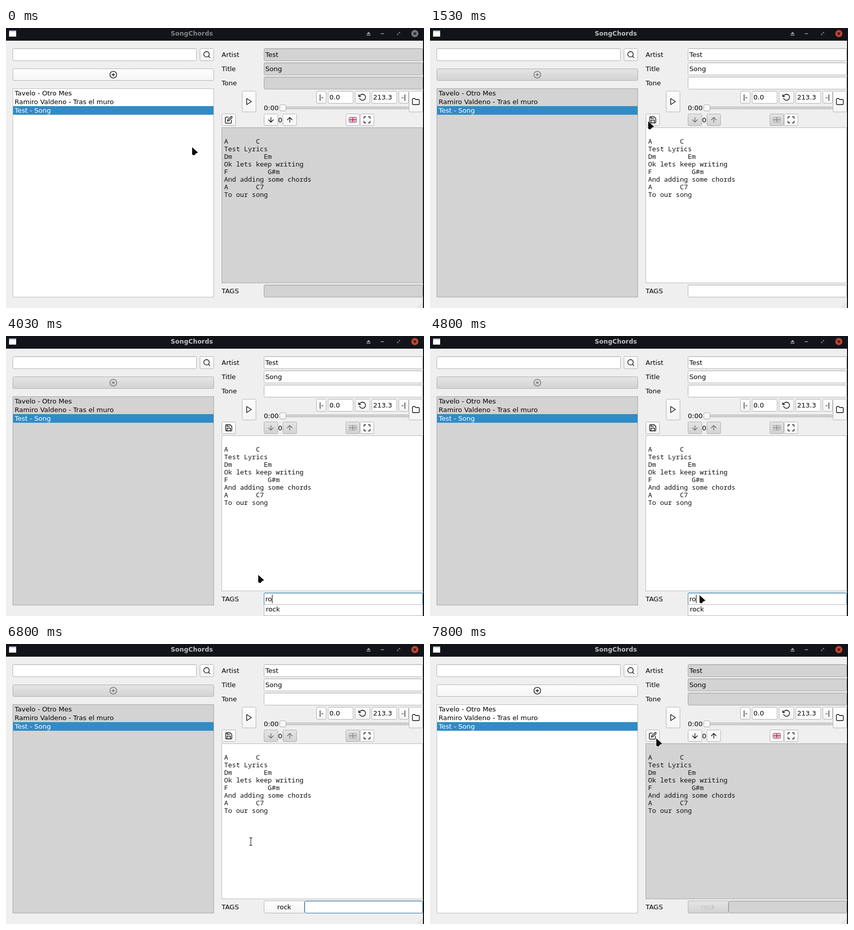
An HTML page for the animation above (8 s loop, 822 by 552 pixels).

```html
<!DOCTYPE html>
<html lang="en">
<head>
<meta charset="utf-8">
<title>SongChords</title>
<style>
html, body { margin: 0; width: 100%; height: 100%; overflow: hidden; background: #efefef; }
svg { display: block; font: 13px "DejaVu Sans", sans-serif; fill: #000; }
text { white-space: pre; }
.mono { font-family: "Noto Sans Mono", monospace; fill: #111; }
.title { font-weight: bold; font-size: 12px; letter-spacing: .17px; }
.icon { fill: none; stroke-width: 2; stroke-linecap: round; stroke-linejoin: round; }
</style>
</head>
<body>
<svg id="stage" width="822" height="552" viewBox="0 0 822 552">
  <defs>
    <linearGradient id="up" x2="0" y2="1"><stop stop-color="#fefefe"/><stop offset="1" stop-color="#f4f4f4"/></linearGradient>
    <linearGradient id="off" x2="0" y2="1"><stop stop-color="#e5e5e5"/><stop offset="1" stop-color="#d2d2d2"/></linearGradient>
  </defs>
  <rect width="822" height="552" fill="#efefef"/>
  <rect width="822" height="25" fill="#131419"/>
  <rect x="820" width="2" height="552" fill="#131419"/>
  <g id="bar"></g>
  <g id="fixed"></g>
  <g id="view"></g>
  <g id="edit"></g>
  <g id="tags"></g>
  <g id="arrow"><path d="M0 0L11.3 10.2Q11.4 11.2 10.2 11.2Q7.4 11.4 6.6 13.4L4.6 15.6Q3.8 16.2 2.8 15.8L0 14.6Z" fill="#0d0d0d" stroke="#fff" stroke-opacity=".75" stroke-width="1.6" paint-order="stroke" stroke-linejoin="round"/></g>
  <g id="beam" fill="none" stroke-linecap="square">
    <path d="M-2.5-7.5H2.5M0-7.5V7.5M-2.5 7.5H2.5" stroke="#fff" stroke-width="3"/>
    <path d="M-2.5-7.5H2.5M0-7.5V7.5M-2.5 7.5H2.5" stroke="#0d0d0d"/>
  </g>
</svg>
<script>
const $ = id => document.getElementById(id);
const DISABLED = '#d3d3d3';
const ICONS = {
  search: 'M3 11a8 8 0 1 0 16 0a8 8 0 1 0-16 0M21 21l-4.35-4.35',
  plus: 'M2 12a10 10 0 1 0 20 0a10 10 0 1 0-20 0M12 8v8M8 12h8',
  play: 'M5 3l14 9-14 9z',
  edit: 'M11 4H4a2 2 0 0 0-2 2v14a2 2 0 0 0 2 2h14a2 2 0 0 0 2-2v-7M18.5 2.5a2.12 2.12 0 0 1 3 3L12 15l-4 1 1-4z',
  save: 'M19 21H5a2 2 0 0 1-2-2V5a2 2 0 0 1 2-2h11l5 5v11a2 2 0 0 1-2 2zM17 21v-8H7v8M7 3v5h8',
  down: 'M12 5v14M19 12l-7 7-7-7',
  up: 'M12 19V5M5 12l7-7 7 7',
  reset: 'M1 4v6h6M3.51 15a9 9 0 1 0 2.13-9.36L1 10',
  folder: 'M22 19a2 2 0 0 1-2 2H4a2 2 0 0 1-2-2V5a2 2 0 0 1 2-2h5l2 3h9a2 2 0 0 1 2 2z',
  full: 'M8 3H5a2 2 0 0 0-2 2v3m18 0V5a2 2 0 0 0-2-2h-3m0 18h3a2 2 0 0 0 2-2v-3M3 16v3a2 2 0 0 0 2 2h3'
};

const rect = (x, y, w, h, fill, more = '') => `<rect x="${x}" y="${y}" width="${w}" height="${h}" fill="${fill}" ${more}/>`;
const box = (x, y, w, h, fill, line, r = 2) => rect(x + .5, y + .5, w - 1, h - 1, fill, `stroke="${line}" rx="${r}"`);
const text = (x, y, s, more = '') => `<text x="${x}" y="${y}" ${more}>${s}</text>`;
const icon = (name, cx, cy, color = '#111') =>
  `<path class="icon" stroke="${color}" transform="translate(${cx - 8} ${cy - 8}) scale(.6667)" d="${ICONS[name]}"/>`;
const button = (x, y, w, h, on = true) => box(x, y, w, h, on ? 'url(#up)' : 'url(#off)', on ? '#b4b4b4' : '#b0b0b0');
const iconButton = (name, x, y, w, h, on = true) =>
  button(x, y, w, h, on) + icon(name, x + w / 2, y + h / 2, on ? '#111' : '#6e6e6e');

function field(x, y, w, on, focus) {
  const line = focus ? '#2b70a5' : on ? '#b2b2b2' : '#a2a2a2';
  return box(x, y, w, 25, on ? '#fff' : DISABLED, line) +
    rect(x + 2, y + 1, w - 4, 1, focus ? '#c4dcec' : on ? '#ededed' : '#c6c6c6');
}

function flag(x, y, on) {
  const [blue, white, red] = on ? ['#3f55a5', '#fff', '#d8283c'] : ['#a6a6a6', '#e6e6e6', '#8f8f8f'];
  return `<g transform="translate(${x} ${y})" fill="none">` + rect(0, 0, 16, 11, blue) +
    `<path d="M0 0L16 11M16 0L0 11" stroke="${white}" stroke-width="2.4"/>
     <path d="M0 0L16 11M16 0L0 11" stroke="${red}" stroke-width=".8"/>
     <path d="M8 0V11M0 5.5H16" stroke="${white}" stroke-width="4"/>
     <path d="M8 0V11M0 5.5H16" stroke="${red}" stroke-width="2"/></g>`;
}

function titleBar(active) {
  const c = active ? '#c2c3c5' : '#85868a';
  return rect(6, 5, 14, 12, '#fff') + rect(6, 5, 14, 3, '#c9d0d8') +
    text(324, 15, 'SongChords', `class="title" fill="${c}"`) +
    `<path d="M709 12L713 7.5L717 12ZM709 13.5h8v1.5h-8Z" fill="#a0a1a4"/>` +
    rect(737, 10.5, 6, 1.5, '#a0a1a4') +
    `<path d="M771 8h4v4ZM769 10v4h4Z" fill="#6f7074"/>
     <circle cx="804" cy="11" r="7" fill="${active ? '#c64531' : '#77787c'}"/>
     <path d="M801.5 8.5l5 5m0-5l-5 5" stroke="#131419" stroke-width="1.5"/>`;
}

function fixedParts() {
  const grip = [0, 1, 2, 3].map(r => [...Array(r + 1)].map((_, i) =>
    rect(818 - i * 3, 541 + r * 3, 1, 1, '#b0b0b0')).join('')).join('');
  const labels = [['Artist', 57], ['Title', 85], ['Tone', 113], ['TAGS', 523]];
  return field(13, 40, 362, true) + iconButton('search', 381, 40, 28, 25) +
    labels.map(([s, y]) => text(424, y, s)).join('') +
    iconButton('play', 464, 124, 28, 42) +
    button(610, 124, 20, 25) + text(620, 141, '|-', 'text-anchor="middle"') +
    field(633, 124, 50, true) + text(636, 141, '0.0') +
    iconButton('reset', 686, 124, 30, 25) +
    field(719, 124, 50, true) + text(722, 141, '213.3') +
    button(772, 124, 20, 25) + text(782, 141, '-|', 'text-anchor="middle"') +
    iconButton('folder', 792, 124, 28, 42) +
    text(507, 162, '0:00') +
    box(540, 155, 252, 5, '#d6d6d6', '#b0b0b0') + box(538, 151, 13, 13, 'url(#up)', '#a9a9a9') +
    text(535, 186, '0') + iconButton('full', 696, 169, 28, 24) + grip;
}

const LYRICS = ['A       C', 'Test Lyrics', 'Dm        Em', 'Ok lets keep writing',
  'F          G#m', 'And adding some chords', 'A       C7', 'To our song'];
const SONGS = ['Tavelo - Otro Mes', 'Ramiro Valdeno - Tras el muro', 'Test - Song'];

function modeParts(edit) {
  const paper = on => on ? ['#fff', '#bcbcbc'] : [DISABLED, '#a6a6a6'];
  return iconButton('plus', 13, 80, 396, 24, !edit) +
    box(13, 119, 396, 412, ...paper(!edit), 0) + rect(14, 154, 394, 17, '#308cc6') +
    SONGS.map((s, i) => text(17, 133 + 17 * i, s, i == 2 ? 'fill="#fff"' : '')).join('') +
    field(507, 40, 313, edit) + text(510, 57, 'Test') +
    field(507, 68, 313, edit) + text(510, 85, 'Song') +
    field(507, 96, 313, edit) +
    `<g ${edit ? 'id="save"' : ''}>` + iconButton(edit ? 'save' : 'edit', 424, 169, 28, 24) + '</g>' +
    iconButton('down', 507, 169, 28, 24, !edit) + iconButton('up', 544, 169, 28, 24, !edit) +
    button(668, 169, 28, 24, !edit) + flag(674, 175.5, !edit) +
    box(424, 196, 396, 307, ...paper(edit), 0) +
    LYRICS.map((s, i) => text(429, 228 + 15 * i, s, 'class="mono"')).join('');
}

const within = (t, a, b) => t >= a && t < b;
const CARET = [[2970, 3500], [3530, 4470], [4800, 5330], [5430, 5700], [6270, 6800], [7330, 7670]];

function tagParts(s) {
  const x = s.tagged ? 587 : 507;
  let out = field(x, 506, 820 - x, s.edit, s.focus) + text(x + 3, 523, s.typed);
  if (s.caret) out += rect(x + 3 + [0, 6, 13][s.typed.length], 510, 1, 17, '#000');
  if (s.tagged) out += button(507, 506, 80, 25, s.edit) +
    text(547, 523, 'rock', `text-anchor="middle" fill="${s.edit ? '#000' : '#bebebe'}"`);
  if (s.popup) out += box(507, 529, 313, 23, '#fff', '#b4b4b4', 0) + text(511, 543, 'rock');
  return out;
}

// start, end, steps, destination
const MOVES = [
  [330, 900, 17, 424, 188], [1530, 1530, 1, 429, 184], [2030, 2130, 2, 479, 316],
  [2270, 2800, 6, 525, 522], [3130, 3130, 1, 497, 473], [3270, 3270, 1, 496, 471],
  [4800, 4800, 1, 530, 511], [5330, 5330, 1, 536, 539], [6670, 6930, 3, 462, 336],
  [7070, 7415, 4, 440, 184], [7530, 7530, 1, 445, 186]
];

function pointer(t) {
  let x = 366, y = 235;
  for (const [a, b, n, tx, ty] of MOVES) {
    if (t < a) break;
    const k = n == 1 ? 1 : Math.min(n, 1 + Math.floor((t - a) / (b - a) * (n - 1) + 1e-6)) / n;
    const e = k * k * (3 - 2 * k);
    x += (tx - x) * e;
    y += (ty - y) * e;
  }
  return [Math.round(x), Math.round(y)];
}

const show = (id, on) => $(id).setAttribute('display', on ? 'inline' : 'none');
const cache = {};
function fill(id, key, make) {
  if (cache[id] === key) return;
  cache[id] = key;
  $(id).innerHTML = make();
}

$('fixed').innerHTML = fixedParts();
$('view').innerHTML = modeParts(false);
$('edit').innerHTML = modeParts(true);

function draw(t) {
  const s = {
    edit: within(t, 1530, 7800),
    focus: within(t, 2970, 7670),
    popup: within(t, 3530, 5430),
    tagged: t >= 5430,
    typed: within(t, 3530, 4030) ? 'r' : within(t, 4030, 5430) ? 'ro' : '',
    caret: CARET.some(([a, b]) => within(t, a, b))
  };
  show('view', !s.edit);
  show('edit', s.edit);
  fill('bar', t >= 1530, () => titleBar(t >= 1530));
  fill('tags', JSON.stringify(s), () => tagParts(s));
  const pressed = t >= 7670;
  fill('save', pressed, () => pressed
    ? box(424, 169, 28, 24, '#d8d8d8', '#acacac') + icon('save', 438, 181)
    : iconButton('save', 424, 169, 28, 24));

  const [x, y] = pointer(t);
  const overText = within(y, 196, 503) || within(y, 506, 531) && x >= (s.tagged ? 587 : 507);
  const beam = s.edit && !s.popup && x >= 424 && overText;
  show('beam', beam);
  show('arrow', !beam);
  $('beam').setAttribute('transform', `translate(${x + .5} ${y + .5})`);
  $('arrow').setAttribute('transform', `translate(${x} ${y})`);
}

function tick() {
  draw(performance.now() % 8000);
  requestAnimationFrame(tick);
}
tick();
</script>
</body>
</html>
```
